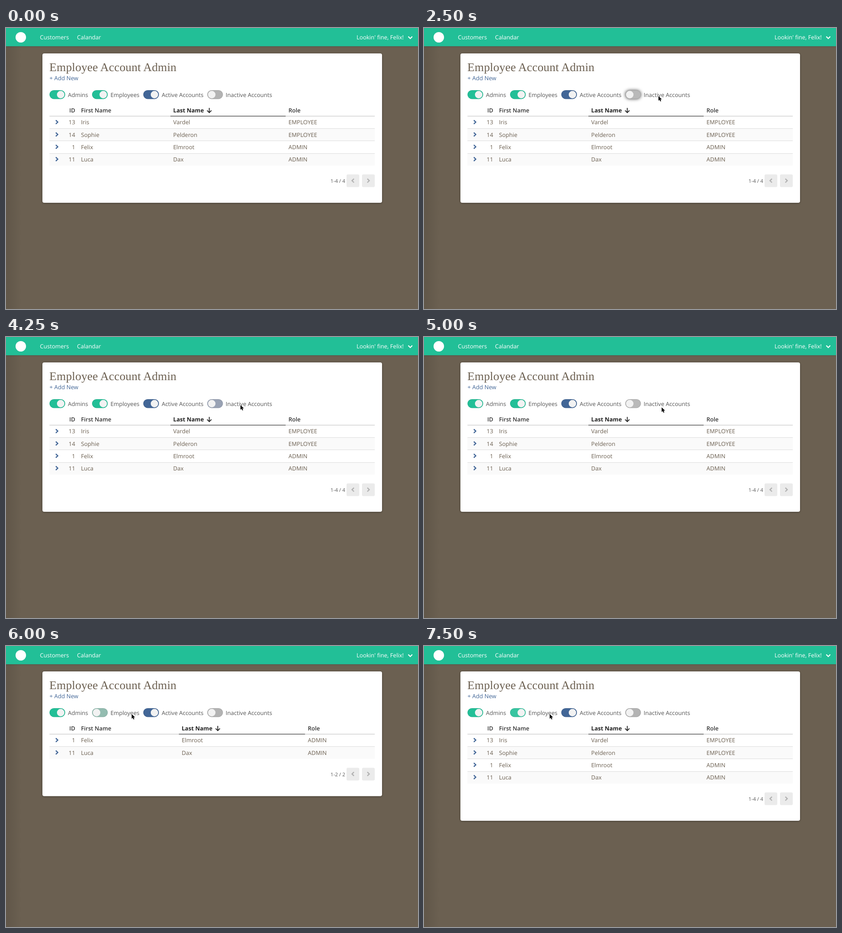
An HTML page with a canvas for the animation above (8 s loop, 905x619 px).

```html
<!DOCTYPE html>
<html lang="en">
<head>
<meta charset="utf-8">
<title>Employee Account Admin</title>
<style>
  html, body { margin: 0; width: 100%; height: 100%; overflow: hidden; background: #6b6051; }
  canvas { display: block; }
</style>
</head>
<body>
<canvas id="stage" width="905" height="619"></canvas>
<script>
const ctx = document.getElementById('stage').getContext('2d');
const LOOP = 8000;
const SANS = '"Open Sans", sans-serif';
const GREEN = '#22bf97', BLUE = '#426697', GREY = '#b3b3b3', TAUPE = '#6b5f50';
const HOVER = { [GREEN]: '#38c5a1', [BLUE]: '#5878a3', [GREY]: '#b9b9b9' };
const FADING = { [GREEN]: '#93bcb0', [BLUE]: '#99a2b4' };
const ROW = 27.2, TABLE_TOP = 194.3, LEFT = 95.5, RIGHT = 810;

// id, first name, last name, role, active
const people = [
  [13, 'Iris', 'Vardel', 'EMPLOYEE', true],
  [12, 'Ned', 'Tranmond', 'EMPLOYEE', false],
  [15, 'Evan', 'Sedmorn', 'EMPLOYEE', false],
  [14, 'Sophie', 'Pelderon', 'EMPLOYEE', true],
  [1, 'Felix', 'Elmroot', 'ADMIN', true],
  [11, 'Luca', 'Dax', 'ADMIN', true],
  [16, 'Seth', 'Bodan', 'ADMIN', false],
];

// time, x, y
const cursorStops = [
  [750, 483, 194], [1000, 512, 148], [1250, 510, 156], [1500, 514, 152],
  [1750, 515, 150], [5000, 522, 155], [5250, 424, 150], [5500, 276, 155], [5750, 276, 150],
];

const within = (t, from, to) => t >= from && t < to;

function text(str, x, y, color, { size = 12.6, weight = 400, family = SANS, align = 'left' } = {}) {
  ctx.font = `${weight} ${size}px ${family}`;
  ctx.textAlign = align;
  ctx.fillStyle = color;
  ctx.fillText(str, x, y);
}

function rect(x, y, w, h, color, radius = 0) {
  ctx.fillStyle = color;
  ctx.beginPath();
  ctx.roundRect(x, y, w, h, radius);
  ctx.fill();
}

function circle(x, y, r, color) {
  ctx.fillStyle = color;
  ctx.beginPath();
  ctx.arc(x, y, r, 0, Math.PI * 2);
  ctx.fill();
}

function line(points, color, width) {
  ctx.strokeStyle = color;
  ctx.lineWidth = width;
  ctx.beginPath();
  points.forEach(([x, y]) => ctx.lineTo(x, y));
  ctx.stroke();
}

// Horizontal chevron; dir 1 points right, -1 left
function chevron(x, y, dir, color) {
  line([[x - 2.3 * dir, y - 4.2], [x + 2 * dir, y], [x - 2.3 * dir, y + 4.2]], color, 2.4);
}

function withShadow(color, blur, dy, draw) {
  ctx.save();
  ctx.shadowColor = color;
  ctx.shadowBlur = blur;
  ctx.shadowOffsetY = dy;
  draw();
  ctx.restore();
}

function toggle(x, label, color, { on = true, hover, pressed, fading } = {}) {
  const base = on ? color : GREY;
  const fill = fading ? FADING[color] : hover ? HOVER[base] : base;
  const pill = () => rect(x, 137, 34.5, 19.4, fill, 9.7);
  if (pressed) withShadow(on ? color : '#555', 7, 0, pill);
  else pill();
  ctx.strokeStyle = 'rgba(0,0,0,.09)';
  ctx.lineWidth = 1;
  ctx.beginPath();
  ctx.roundRect(x + .5, 137.5, 33.5, 18.4, 9.2);
  ctx.stroke();
  circle(x + (on ? 24.6 : 10), 146.7, 8.2, '#f2f2f2');
  text(label, x + 40.5, 151.5, '#555');
}

function drawPage() {
  rect(0, 0, 905, 619, '#6b6051');
  const shade = ctx.createLinearGradient(0, 0, 34, 0);
  shade.addColorStop(0, 'rgba(0,0,0,.1)');
  shade.addColorStop(1, 'rgba(0,0,0,0)');
  rect(0, 40, 34, 579, shade);
  withShadow('rgba(0,0,0,.3)', 3, 1, () => rect(0, 0, 905, 40.3, GREEN));
  circle(32.5, 20.5, 11.5, '#fff');
  text('Customers', 74.5, 25, '#fff');
  text('Calandar', 156, 25, '#fff');
  text("Lookin' fine, Felix!", 770, 25, '#fff');
  line([[883.6, 18.8], [888, 23.2], [892.4, 18.8]], '#fff', 2.2);
}

function drawTable(rows) {
  const compact = rows.length === 2;
  const lastX = compact ? 386 : 367.3;
  const roleX = compact ? 663 : 620.5;
  const tableEnd = TABLE_TOP + rows.length * ROW;

  const head = { weight: 600 };
  text('ID', 152, 186, '#333', { ...head, align: 'right' });
  text('First Name', 164.8, 186, '#333', head);
  text('Last Name', lastX, 186, '#222', { weight: 700 });
  text('Role', roleX, 186, '#333', head);
  const arrowX = lastX + 79.2;
  line([[arrowX, 176], [arrowX, 186]], '#222', 1.8);
  line([[arrowX - 4.8, 181.7], [arrowX, 186.4], [arrowX + 4.8, 181.7]], '#222', 1.8);

  rows.forEach(([id, first, last, role, active], i) => {
    const top = TABLE_TOP + i * ROW;
    const base = top + 18;
    const color = active ? TAUPE : '#bcbcbc';
    if (i % 2) rect(LEFT, top, RIGHT - LEFT, ROW, '#fafafa');
    if (i) rect(LEFT, Math.round(top - .3), RIGHT - LEFT, 1, '#dcdcdc');
    chevron(111.7, top + 13, 1, BLUE);
    text(id, 152, base, color, { align: 'right' });
    text(first, 164.8, base, color);
    text(last, lastX, base, color);
    text(role, roleX, base, color);
  });
  rect(LEFT, 193.6, RIGHT - LEFT, 1.4, '#d2d2d2');
  rect(lastX - 6.2, 193.5, roleX - lastX, 1.5, '#5c5c5c');

  text(`1-${rows.length} / ${rows.length}`, 745, tableEnd + 38, '#555', { size: 11, align: 'right' });
  [[748, -1], [782, 1]].forEach(([x, dir]) => {
    rect(x, tableEnd + 19.5, 28, 28, '#ebebeb', 3);
    chevron(x + 14, tableEnd + 33.2, dir, '#b2b2b2');
  });
}

function drawCursor(t) {
  const stop = cursorStops.filter(([from]) => t >= from).pop();
  if (!stop) return;
  ctx.save();
  ctx.translate(stop[1], stop[2]);
  const arrow = new Path2D('M0 0V10.2L2.4 8 4 11.8 5.9 11 4.3 7.3H7.5Z');
  ctx.strokeStyle = '#fff';
  ctx.lineWidth = 1.4;
  ctx.stroke(arrow);
  ctx.fillStyle = '#000';
  ctx.fill(arrow);
  ctx.restore();
}

function draw(t) {
  const showInactive = within(t, 2750, 4250);
  const showEmployees = !within(t, 6000, 7250);
  const rows = people.filter(([, , , role, active]) =>
    (active || showInactive) && (role === 'ADMIN' || showEmployees));

  drawPage();
  withShadow('rgba(0,0,0,.35)', 4, 1, () =>
    rect(80, 56, 746, TABLE_TOP + rows.length * ROW + 82 - 56, '#fff', 4));
  ctx.letterSpacing = '.15px';
  text('Employee Account Admin', 95.3, 95, TAUPE, { size: 26, family: '"Liberation Serif", serif' });
  ctx.letterSpacing = '0px';
  text('+ Add New', 95.5, 115, BLUE);

  toggle(95.5, 'Admins', GREEN);
  toggle(189, 'Employees', GREEN, {
    on: showEmployees,
    hover: t >= 5500,
    pressed: within(t, 5750, 6000) || within(t, 7000, 7250),
    fading: within(t, 6000, 6250),
  });
  toggle(301.5, 'Active Accounts', BLUE);
  toggle(442, 'Inactive Accounts', BLUE, {
    on: showInactive,
    hover: within(t, 2500, 5500),
    pressed: within(t, 2500, 2750),
    fading: within(t, 4250, 4500),
  });
  drawTable(rows);
  drawCursor(t);
}

ctx.textRendering = 'geometricPrecision';
function tick() {
  draw(performance.now() % LOOP);
  requestAnimationFrame(tick);
}
tick();
</script>
</body>
</html>
```
